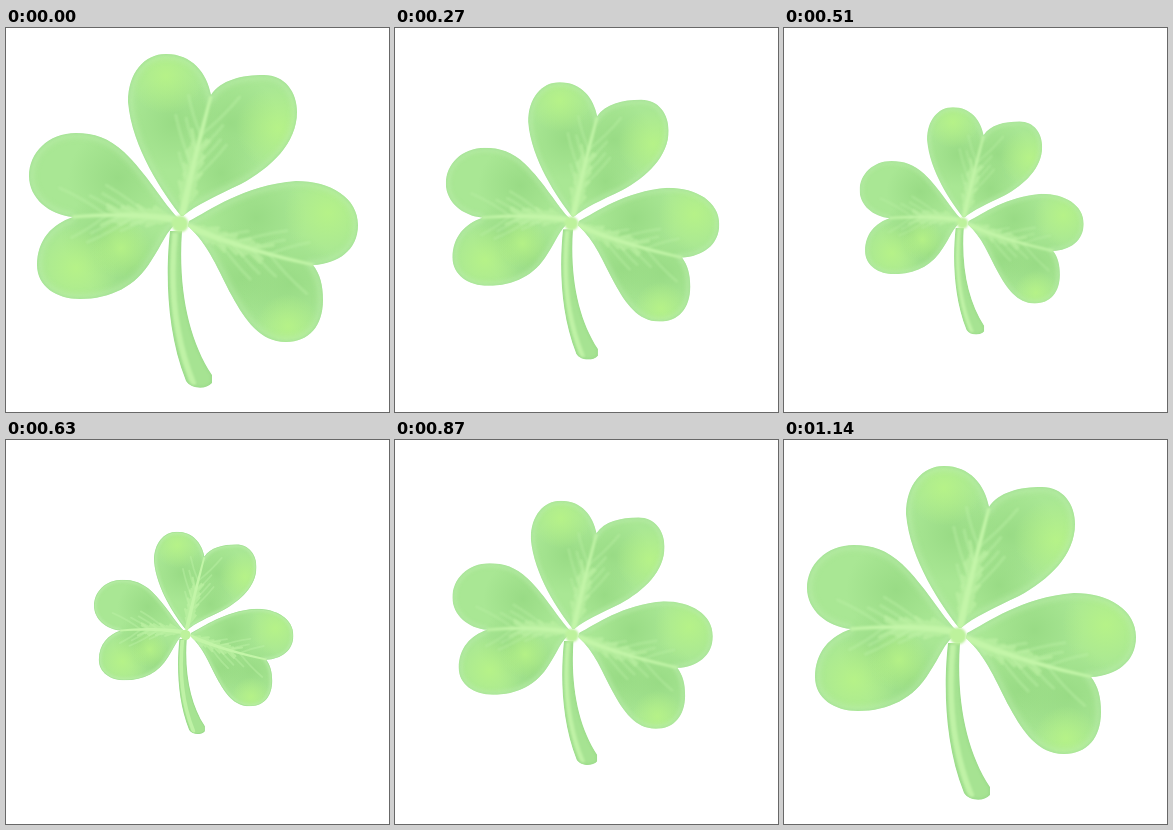
Recreate the animation shown at these times as an HTML page. Size 383x384 px, loop 1210 ms.

```html
<!DOCTYPE html>
<html lang="en">
<head>
<meta charset="utf-8">
<title>Pulsing clover</title>
<style>
  html, body { margin: 0; width: 100%; height: 100%; overflow: hidden; background: #fff; }
  svg { display: block; width: 100vw; height: 100vh; }
  path { fill: none; stroke-linecap: round; }
</style>
</head>
<body>
<svg viewBox="0 0 383 384">
  <defs>
    <filter id="soft" x="-20%" y="-20%" width="140%" height="140%"><feGaussianBlur stdDeviation="1.2"/></filter>
    <filter id="wide" x="-50%" y="-50%" width="200%" height="200%"><feGaussianBlur stdDeviation="3"/></filter>
    <radialGradient id="warm">
      <stop offset="0" stop-color="#b8f486"/>
      <stop offset="1" stop-color="#b8f486" stop-opacity="0"/>
    </radialGradient>
    <radialGradient id="shade">
      <stop offset="0" stop-color="#92d67f"/>
      <stop offset="1" stop-color="#92d67f" stop-opacity="0"/>
    </radialGradient>
  </defs>
  <g id="clover"></g>
</svg>
<script>
const clover = document.getElementById('clover');

// rib: start, control and end of the middle vein; warm and shade: x, y, radius of soft spots
const leaves = [
  {
    outline: 'M175 188C157 165 126 120 122 74C122 45 138 26 160 26C186 26 201 45 205 67C215 52 235 47 258 47C279 47 291 64 291 84C291 115 265 140 235 156C210 168 190 177 177 188Z',
    rib: [[176, 188], [187, 135], [205, 68]],
    warm: [[272, 100, 42], [160, 48, 38]],
    shade: [[168, 95, 48], [225, 95, 48], [215, 145, 40]]
  },
  {
    outline: 'M172 190C158 176 141 146 118 124C103 110 88 105 70 105C42 105 23 125 23 148C23 170 43 187 67 189C46 196 31 212 31 237C31 258 50 271 74 271C105 271 130 258 145 233C156 217 160 203 172 194Z',
    rib: [[173, 192], [125, 184], [66, 189]],
    warm: [[70, 240, 42], [115, 220, 30]],
    shade: [[112, 150, 50], [95, 208, 40], [125, 240, 45]]
  },
  {
    outline: 'M183 193C203 183 238 157 290 153C325 153 352 170 352 197C352 222 332 236 307 237C314 246 317 257 317 272C317 298 303 314 280 314C254 314 239 292 226 268C212 242 203 217 182 198Z',
    rib: [[177, 196], [230, 220], [308, 237]],
    warm: [[322, 185, 44], [282, 298, 32]],
    shade: [[250, 190, 50], [235, 250, 55], [285, 255, 50]]
  }
];
const stem = 'M164 203C160 240 159 300 180 353C185 361 200 362 206 355L206 347C183 312 172 262 176 203Z';

const line = (d, color, width, opacity = 1, filter = 'soft') =>
  `<path d="${d}" stroke="${color}" stroke-width="${width}" opacity="${opacity}" filter="url(#${filter})"/>`;

const spots = (list, tone, opacity) => list.map(([x, y, r]) =>
  `<circle cx="${x}" cy="${y}" r="${r}" fill="url(#${tone})" opacity="${opacity}"/>`).join('');

const along = ([a, b, c], u) =>
  [0, 1].map(i => (1 - u) ** 2 * a[i] + 2 * u * (1 - u) * b[i] + u * u * c[i]);

function sideVeins(rib, from, to, count, length, spread) {
  let d = '';
  for (let k = 0; k < count; k++) {
    const u = from + (to - from) * k / (count - 1);
    const [x, y] = along(rib, u);
    const [nx, ny] = along(rib, u + 0.02);
    const heading = Math.atan2(ny - y, nx - x);
    for (const side of [-1, 1]) {
      const reach = length * (0.85 + 0.25 * Math.sin(k * 2.4 + side));
      const step = (r, a) => `${r * Math.cos(heading + side * a)} ${r * Math.sin(heading + side * a)}`;
      d += `M${x} ${y}q${step(reach * 0.5, spread * 1.2)} ${step(reach, spread)}`;
    }
  }
  return d;
}

function taperedRib(rib) {
  const left = [], right = [];
  for (let u = 0; u <= 1.001; u += 0.1) {
    const [x, y] = along(rib, u), [nx, ny] = along(rib, u + 0.01);
    const len = Math.hypot(nx - x, ny - y), w = 3.4 - 2 * u;
    const ox = (y - ny) / len * w, oy = (nx - x) / len * w;
    left.push([x + ox, y + oy]);
    right.unshift([x - ox, y - oy]);
  }
  return 'M' + left.concat(right).join('L') + 'Z';
}

const clipped = (id, outline, content) =>
  `<clipPath id="${id}"><path d="${outline}"/></clipPath><g clip-path="url(#${id})">${content}</g>`;

const drawLeaf = ({ outline, rib, warm, shade }, i) => clipped('leaf' + i, outline,
  `<path d="${outline}" style="fill:#a9e794"/>` +
  spots(shade, 'shade', 0.7) +
  spots(warm, 'warm', 0.85) +
  line(sideVeins(rib, 0.3, 0.7, 4, 50, 0.55), '#bcf1a6', 3, 0.45) +
  line(sideVeins(rib, 0.08, 0.58, 10, 19, 0.5), '#c0f3a6', 3.4, 0.6) +
  line(outline, '#bdeeae', 8, 0.65, 'wide') +
  line(outline, '#9bdc8f', 2.5, 0.55) +
  `<path d="${taperedRib(rib)}" style="fill:#c3f5a8" filter="url(#soft)"/>`);

clover.innerHTML =
  leaves.map(drawLeaf).join('') +
  clipped('stalk', stem,
    `<path d="${stem}" style="fill:#a6e392"/>` +
    line('M169 203C164 250 167 305 187 355', '#bff2a6', 6) +
    line(stem, '#98d889', 3, 0.7)) +
  '<circle cx="174" cy="196" r="8.5" fill="#bdf29c" filter="url(#soft)"/>';

const STEP = 30, LOW = 21, LAST = 38, SMALL = 0.606;

function draw(now) {
  const n = Math.min(LAST, Math.floor(now % 1210 / STEP));
  const depth = n < LOW ? n / LOW : (LAST - n) / (LAST - LOW);
  const scale = 1 - (1 - SMALL) * depth;
  clover.setAttribute('transform', `translate(188 193) scale(${scale}) translate(-188 -193)`);
}

const start = performance.now();
function tick() {
  draw(performance.now() - start);
  requestAnimationFrame(tick);
}
tick();
</script>
</body>
</html>
```
